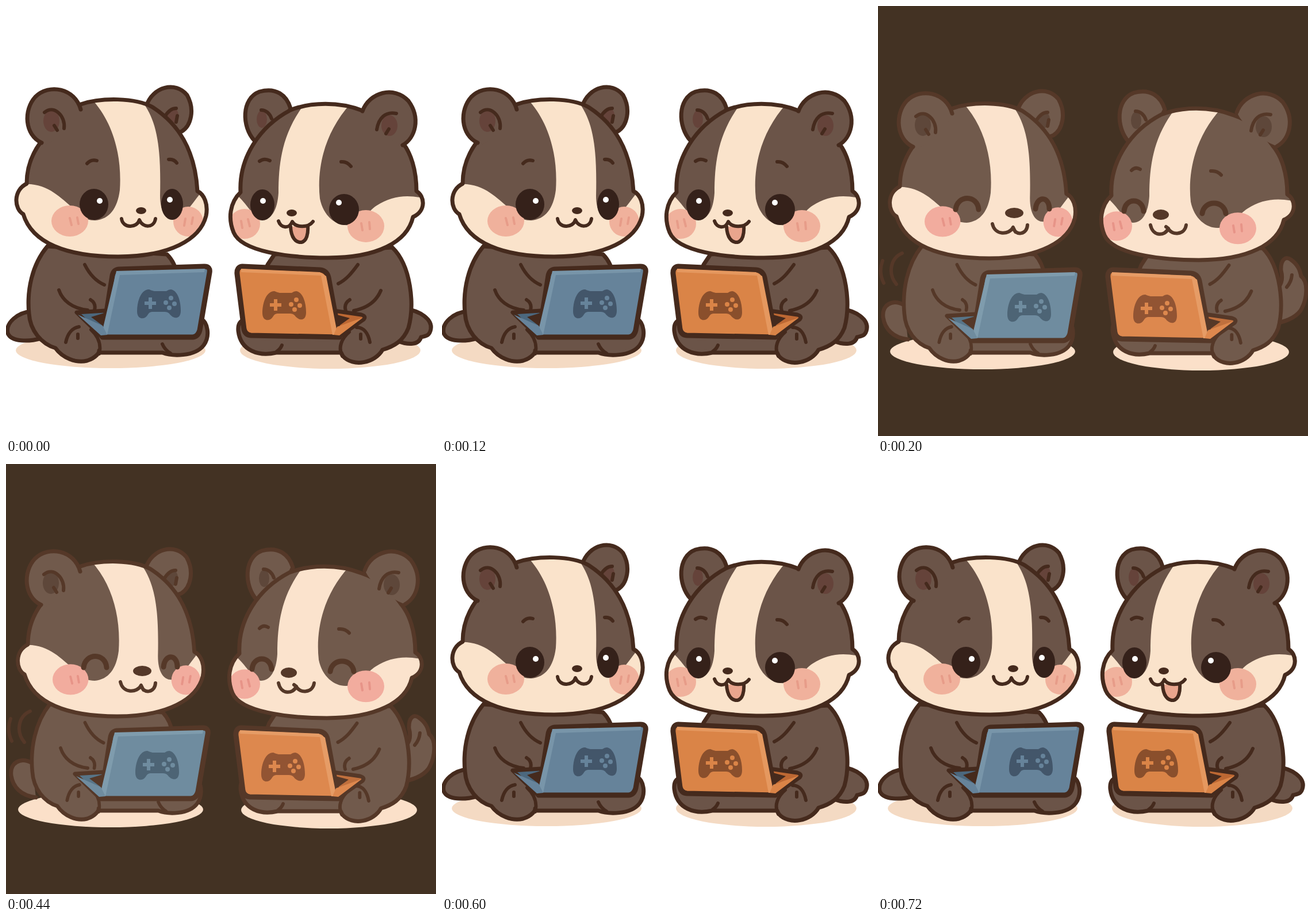
Animation, 748 px wide and 748 px high, one loop 800 ms. Source, as an HTML page:

```html
<!DOCTYPE html>
<html lang="en">
<head>
<meta charset="utf-8">
<title>Two badgers gaming</title>
<style>
  html, body { margin: 0; width: 100%; height: 100%; overflow: hidden; background: #fff; }
  svg { display: block; width: 100%; height: 100%; }

  .calm {
    --line: #452a1d; --fur: #6b5448; --cream: #fae3cb; --blush: #f0b19c; --tick: #e79c89;
    --inner: #65433a; --ground: #f4dac3;
    --blue: #66839a; --blue-lit: #7895a9; --blue-dim: #4c687e; --blue-pad: #43566a;
    --orange: #da8447; --orange-lit: #e5985f; --orange-dim: #bd6833; --orange-pad: #8a4f2c;
  }
  .happy {
    --line: #553828; --fur: #715a4c; --cream: #fbe3cd; --blush: #f2ac9e; --tick: #e79488;
    --inner: #5e473a; --ground: #fbe0c9;
    --blue: #6f8c9f; --blue-lit: #7f9cad; --blue-dim: #587588; --blue-pad: #4d6475;
    --orange: #dd884e; --orange-lit: #e69c66; --orange-dim: #c0703d; --orange-pad: #925433;
    animation: pose 800ms step-end infinite;
  }
  .happy .left {
    --body: matrix(.945, 0, 0, 1, 8, 0);
    --skull: matrix(.975, 0, 0, .985, 3, 9.5);
    --ears: translate(-1px, 7px);
    --cheek: translate(1px, -3px);
    --laptop: translate(-3px, 6px);
  }
  .happy .right {
    --body: matrix(.973, 0, 0, 1, 15, 1);
    --skull: matrix(1, 0, 0, .985, -2, 10.5);
    --ears: translate(4px, 2px);
    --cheek: translate(2px, -1px);
    --laptop: translate(-2px, 6px);
  }
  @keyframes pose {
    0%, 75% { visibility: hidden; }
    25% { visibility: visible; }
  }

  .body { transform: var(--body); }
  .skull { transform: var(--skull); }
  .ears { transform: var(--ears); }
  .cheek { transform: var(--cheek); }
  .laptop { transform: var(--laptop); }

  .fur { fill: var(--fur); }
  .cream { fill: var(--cream); }
  .ground { fill: var(--ground); }
  .inner { fill: var(--inner); }
  .dark { fill: var(--line); }
  .eye { fill: #35211a; }
  .shine { fill: #fff; }
  .tongue { fill: #e9a58d; }
  .blush { fill: var(--blush); }
  .line, .thin, .edge, .tick, .lid-line { stroke: var(--line); stroke-linecap: round; stroke-linejoin: round; }
  .line { stroke-width: 7; }
  .thin { stroke-width: 6; fill: none; }
  .edge { stroke-width: 7; fill: none; }
  .lid-line { stroke-width: 9; }
  .tick { stroke: var(--tick); stroke-width: 4; fill: none; }
  .lash { stroke-width: 9; }

  .blue { --lid: var(--blue); --lit: var(--blue-lit); --dim: var(--blue-dim); --pad: var(--blue-pad); }
  .orange { --lid: var(--orange); --lit: var(--orange-lit); --dim: var(--orange-dim); --pad: var(--orange-pad); }
  .lid { fill: var(--lid); }
  .lit { fill: var(--lit); }
  .dim { fill: var(--dim); }
  .pad { fill: var(--pad); }
</style>
</head>
<body>
<svg viewBox="0 0 748 748">
  <defs>
    <g id="pad">
      <path class="pad" d="M-17 -25 Q-13 -23 -8 -22 H13 Q17 -25 21 -25 C33 -23 38 -4 38 12 C38 28 25 27 18 17 Q15 14 10 14 H-12 Q-17 14 -20 20 C-25 28 -38 28 -38 13 C-38 -5 -31 -25 -17 -25Z"/>
      <path class="lid" d="M-18 -11 h6 v7 h7 v6 h-7 v7 h-6 v-7 h-7 v-6 h7Z"/>
      <g class="lid">
        <circle cx="21" cy="-10" r="4"/><circle cx="12" cy="-2" r="4"/>
        <circle cx="27" cy="0" r="4"/><circle cx="18" cy="7" r="4"/>
      </g>
    </g>

    <path id="headL" d="M130 171 C165 159 225 159 255 176 C300 205 329 250 333 322 C345 328 352 345 348 365 C338 406 285 436 195 436 C105 436 45 412 30 362 C14 353 12 321 36 309 C36 275 50 245 75 220 C90 198 108 182 130 171Z"/>
    <path id="headR" d="M620 182 C580 166 530 167 495 181 C440 210 405 265 408 324 C389 342 386 370 396 394 C410 427 490 438 560 438 C645 438 698 411 708 367 C732 356 728 330 714 322 C714 285 704 255 690 238 C675 215 650 192 620 182Z"/>
    <clipPath id="clipL"><use href="#headL"/></clipPath>
    <clipPath id="clipR"><use href="#headR"/></clipPath>

    <g id="bodyL" class="body">
      <path class="fur line" d="M72 418 C45 450 36 495 40 535 C42 565 62 588 86 595 C98 612 122 622 141 617 C157 612 163 602 162 599 L163 603 H272 C288 609 328 611 344 590 C356 573 350 550 340 545 L298 470 C296 455 290 442 280 432Z"/>
      <path class="thin" d="M137 450 C145 466 155 478 171 485 M92 494 C98 512 115 526 142 529 M147 511 Q157 517 154 529 M104 585 C107 570 115 560 127 558 M125 571 v7 M148 563 C161 575 166 590 162 605 M272 588 Q276 598 286 604"/>
    </g>
    <g id="bodyR" class="body">
      <path class="fur line" d="M672 420 C705 452 711 520 700 560 C691 583 675 592 655 598 C642 621 604 629 586 609 L583 603 H470 C440 610 408 600 404 565 C403 552 408 548 415 545 L455 450 L467 432Z"/>
      <path class="thin" d="M612 450 C601 465 592 476 578 483 M652 495 C645 512 630 525 605 530 M598 511 Q587 518 591 530 M633 585 C630 569 622 559 610 559 M617 571 v8 M597 567 C584 578 577 594 585 609 M471 601 Q478 596 480 590"/>
    </g>

    <g id="skullL">
      <g class="ears">
        <path class="fur line" d="M244 174 C255 140 295 130 315 155 C329 180 322 208 306 218 L270 230Z"/>
        <ellipse class="inner" cx="290" cy="191" rx="10" ry="14"/>
        <path class="thin" d="M276 193 C281 184 288 178 296 178 M298 191 L296 202"/>
      </g>
      <g class="skull">
        <use href="#headL" class="cream"/>
        <g clip-path="url(#clipL)">
          <path class="fur" d="M147 160 C186 200 202 260 198 320 C194 352 180 371 155 373 C133 373 128 360 116 351 C96 335 72 307 30 310 L30 150Z"/>
          <path class="fur" d="M232 160 C262 195 270 240 268 330 C268 360 280 374 296 371 C310 365 320 349 338 326 L345 150Z"/>
          <g class="cheek">
            <ellipse class="blush" cx="111" cy="374" rx="32" ry="27"/>
            <ellipse class="blush" cx="317" cy="375" rx="26" ry="26"/>
            <path class="tick" d="M111 369 l3 12 M124 368 l2 11 M312 370 l-2 12 M325 368 l-2 11"/>
          </g>
        </g>
        <use href="#headL" class="edge"/>
      </g>
      <g class="ears">
        <path class="fur" d="M62 238 C32 224 30 181 51 158 C75 134 120 143 130 180 Q118 214 66 244Z"/>
        <path class="edge" d="M62 238 C32 224 30 181 51 158 C75 134 120 143 130 180"/>
        <ellipse class="inner" cx="79" cy="200" rx="14" ry="19"/>
        <path class="thin" d="M67 185 C84 171 104 192 101 213 M84 208 L89 216"/>
      </g>
    </g>
    <g id="skullR">
      <g class="ears">
        <path class="fur line" d="M432 234 C410 210 409 161 441 149 C470 141 488 155 495 178 L470 230Z"/>
        <ellipse class="inner" cx="445" cy="197" rx="9" ry="15"/>
        <path class="thin" d="M444 181 C452 181 459 187 462 196"/>
      </g>
      <g class="skull">
        <use href="#headR" class="cream"/>
        <g clip-path="url(#clipR)">
          <path class="fur" d="M521 168 C481 220 474 270 474 325 C472 355 462 372 445 372 C432 370 422 348 404 331 L395 150Z"/>
          <path class="fur" d="M605 164 C555 215 540 280 546 335 C553 370 580 386 602 380 C625 372 628 358 645 347 C668 332 692 328 720 333 L730 150Z"/>
          <g class="cheek">
            <ellipse class="blush" cx="415" cy="379" rx="27" ry="26"/>
            <ellipse class="blush" cx="626" cy="383" rx="32" ry="28"/>
            <path class="tick" d="M409 374 l2 12 M421 371 l3 12 M618 378 l2 12 M632 376 l1 12"/>
          </g>
        </g>
        <use href="#headR" class="edge"/>
      </g>
      <g class="ears">
        <path class="fur" d="M620 183 C632 150 675 138 700 165 C722 195 712 230 690 242 Q640 222 620 183Z"/>
        <path class="edge" d="M620 183 C632 150 675 138 700 165 C722 195 712 230 690 242"/>
        <ellipse class="inner" cx="667" cy="208" rx="14" ry="18"/>
        <path class="thin" d="M645 215 C648 195 660 183 679 187 M661 222 L666 214"/>
      </g>
    </g>

    <g id="laptopL" class="laptop blue">
      <path class="dim line" d="M123 533 L172 530 L186 575 L166 575Z"/>
      <path class="dark" d="M148 541 L171 534 L168 556Z"/>
      <path class="lid lid-line" d="M196 458 L345 453 Q356 453 354 464 L337 564 Q334 575 325 576 L168 576 L185 469 Q187 459 196 458Z"/>
      <path class="lit" d="M192 461 L346 457 L345 463 L198 468 L176 572 L166 572Z"/>
      <path class="lid" d="M125 537 L168 556 L176 572 L165 573Z"/>
      <use href="#pad" x="266" y="518"/>
    </g>
    <g id="laptopR" class="laptop orange">
      <path class="dim line" d="M570 530 L618 537 Q628 540 621 546 L580 575Z"/>
      <path class="dark" d="M572 536 L598 543 L577 558Z"/>
      <path class="lid lid-line" d="M411 453 L546 459 Q558 460 561 472 L580 576 L426 573 Q416 572 414 562 L402 466 Q401 454 411 453Z"/>
      <path class="lit" d="M409 457 L546 463 L557 470 L577 572 L568 572 L548 469 L409 463Z"/>
      <path class="lid" d="M621 542 L580 573 L570 572 L576 558Z"/>
      <use href="#pad" x="484" y="521"/>
    </g>
  </defs>

  <g class="calm">
    <rect width="748" height="748" fill="#fff"/>
    <g class="left">
      <ellipse class="ground" cx="182" cy="599" rx="165" ry="31"/>
      <path class="fur line" d="M45 531 C20 533 -1 551 3 569 C9 585 40 584 62 578"/>
      <use href="#bodyL"/>
      <use href="#skullL"/>
      <ellipse class="eye" cx="153" cy="345" rx="25" ry="27"/>
      <ellipse class="eye" cx="289" cy="345" rx="19" ry="27"/>
      <circle class="shine" cx="163" cy="339" r="5"/>
      <circle class="shine" cx="285" cy="337" r="5"/>
      <ellipse class="dark" cx="235" cy="356" rx="9" ry="6"/>
      <path class="thin" d="M201 370 C203 387 228 387 232 372 C238 387 258 386 260 370 M141 274 Q148 266 158 269 M283 267 Q292 266 297 273"/>
      <use href="#laptopL"/>
    </g>
    <g class="right">
      <ellipse class="ground" cx="564" cy="599" rx="157" ry="32"/>
      <path class="fur line" d="M695 527 C720 530 742 545 739 562 C737 574 730 574 722 576 C718 590 700 590 682 583"/>
      <use href="#bodyR"/>
      <use href="#skullR"/>
      <ellipse class="eye" cx="446" cy="346" rx="21" ry="27"/>
      <ellipse class="eye" cx="588" cy="354" rx="26" ry="27"/>
      <circle class="shine" cx="447" cy="339" r="5"/>
      <circle class="shine" cx="579" cy="342" r="5"/>
      <ellipse class="dark" cx="497" cy="360" rx="9" ry="6"/>
      <path class="tongue" d="M495 384 C496 403 504 412 514 411 C523 409 526 396 525 382Z"/>
      <path class="thin" d="M474 374 C478 387 493 388 498 375 C504 386 526 386 534 375 M495 384 C496 403 504 412 514 411 C523 409 526 396 525 382 M441 270 Q449 264 459 269 M583 271 Q593 270 600 279"/>
      <use href="#laptopR"/>
    </g>
  </g>

  <g class="happy">
    <rect width="748" height="748" fill="#433223"/>
    <g class="left">
      <ellipse class="ground" cx="182" cy="601" rx="161" ry="31"/>
      <path class="thin" d="M8 443 C3 456 4 470 10 482 M42 430 C21 439 17 466 32 484"/>
      <path class="fur line" d="M45 520 C25 509 6 520 9 542 C12 562 26 577 52 580"/>
      <use href="#bodyL"/>
      <use href="#skullL"/>
      <path class="thin lash" d="M135 354 C138 328 173 328 175 354 M274 353 C276 330 298 330 298 353"/>
      <ellipse class="dark" cx="237" cy="360" rx="16" ry="9"/>
      <path class="thin" d="M199 379 C203 399 228 399 235 385 C238 400 259 399 260 381 M235 385 l4 8"/>
      <use href="#laptopL"/>
    </g>
    <g class="right">
      <ellipse class="ground" cx="562" cy="602" rx="153" ry="32"/>
      <path class="fur line" d="M685 500 C703 488 705 475 701 460 C700 440 710 435 718 441 C731 450 734 460 736 470 C749 480 747 510 735 530 C725 543 708 550 685 553"/>
      <path class="thin" d="M720 468 Q719 480 711 489"/>
      <use href="#bodyR"/>
      <use href="#skullR"/>
      <path class="thin lash" d="M428 357 C430 333 460 333 462 357 M564 361 C567 337 602 337 605 361"/>
      <ellipse class="dark" cx="492" cy="363" rx="14" ry="9"/>
      <path class="thin" d="M474 381 C478 401 499 401 505 387 C511 400 534 398 536 381 M505 387 l-4 -3 M441 286 Q448 279 456 284 M579 287 Q590 286 597 294"/>
      <use href="#laptopR"/>
    </g>
  </g>
</svg>
</body>
</html>
```
